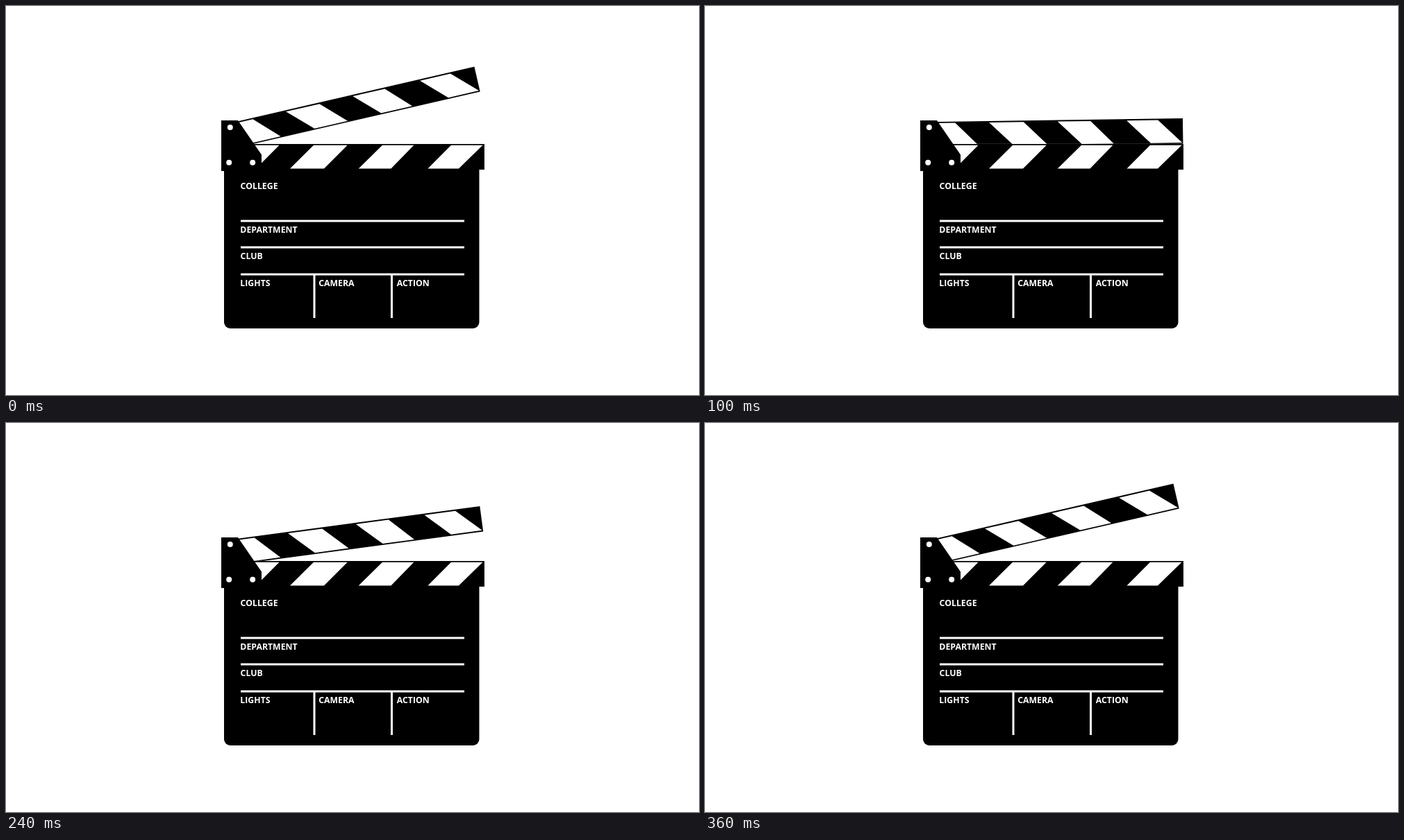
These frames come from a looping animation (998 by 561 pixels, 660 ms). An HTML page:

```html
<!DOCTYPE html>
<html lang="en">
<head>
<meta charset="utf-8">
<title>Clapperboard</title>
<style>
  html, body { margin: 0; width: 100%; height: 100%; overflow: hidden; background: #fff; }
  svg { display: block; width: 100vw; height: 100vh; }
  text { font: 700 12.3px "Open Sans", sans-serif; fill: #fff; }
  .white { fill: #fff; }
  .rule { stroke: #fff; stroke-width: 3; fill: none; }
</style>
</head>
<body>
<svg viewBox="0 0 998 561">
  <g id="arm">
    <path d="M320 167H688.3V203.8H320Z"/>
    <path class="white" d="M325 169H360.5L394 202H325Z
      M409.3 169H459L493 202H444Z
      M508 169H555.5L588.5 202H542.5Z
      M607.5 169H652.5L687 202H641.8Z"/>
  </g>

  <path d="M358 198.8H688.5" stroke="#fff" stroke-opacity=".25" stroke-width=".8"/>
  <path d="M340 199H689V236H340Z"/>
  <path class="white" d="M350 200.8H393.5L360 234.5H350Z
    M443 200.8H491.7L458 234.5H409Z
    M542 200.8H587.3L554.5 234.5H507.7Z
    M641 200.8H686.5L652 234.5H607.5Z"/>

  <path d="M310 165H334L368 214.5V238H310Z"/>
  <g class="white">
    <circle cx="322.8" cy="175" r="4"/>
    <circle cx="321.2" cy="225.8" r="4"/>
    <circle cx="355.2" cy="225.8" r="4"/>
  </g>

  <path d="M314 235H681.5V456a9 9 0 0 1-9 9H323a9 9 0 0 1-9-9Z"/>
  <path class="rule" d="M338 310H660M338 348H660M338 387H660M444 387V450M555.5 387V450"/>

  <text x="337.6" y="264.2">COLLEGE</text>
  <text x="337.3" y="327.3">DEPARTMENT</text>
  <text x="337.6" y="364.5">CLUB</text>
  <text x="337.3" y="403.7">LIGHTS</text>
  <text x="450.2" y="403.7">CAMERA</text>
  <text x="562.8" y="403.7">ACTION</text>
</svg>
<script>
  const LOOP = 660, STEP = 20;
  const SHUT_AT = 100, OPEN_AT = 360;
  const OPEN = 13, SHUT = 0.8;
  const arm = document.getElementById('arm');

  const ease = x => (1 - Math.cos(Math.PI * x)) / 2;
  const mix = (a, b, x) => a + (b - a) * ease(x);

  function angle(t) {
    if (t < SHUT_AT) return mix(OPEN, SHUT, t / SHUT_AT);
    if (t < OPEN_AT) return mix(SHUT, OPEN, (t - SHUT_AT) / (OPEN_AT - SHUT_AT));
    return OPEN;
  }

  const start = performance.now();
  function draw(now) {
    const t = Math.max(0, now - start) % LOOP;
    const tick = Math.floor(t / STEP) * STEP;
    arm.setAttribute('transform', `rotate(${-angle(tick)} 333 188)`);
    requestAnimationFrame(draw);
  }
  draw(start);
</script>
</body>
</html>
```
